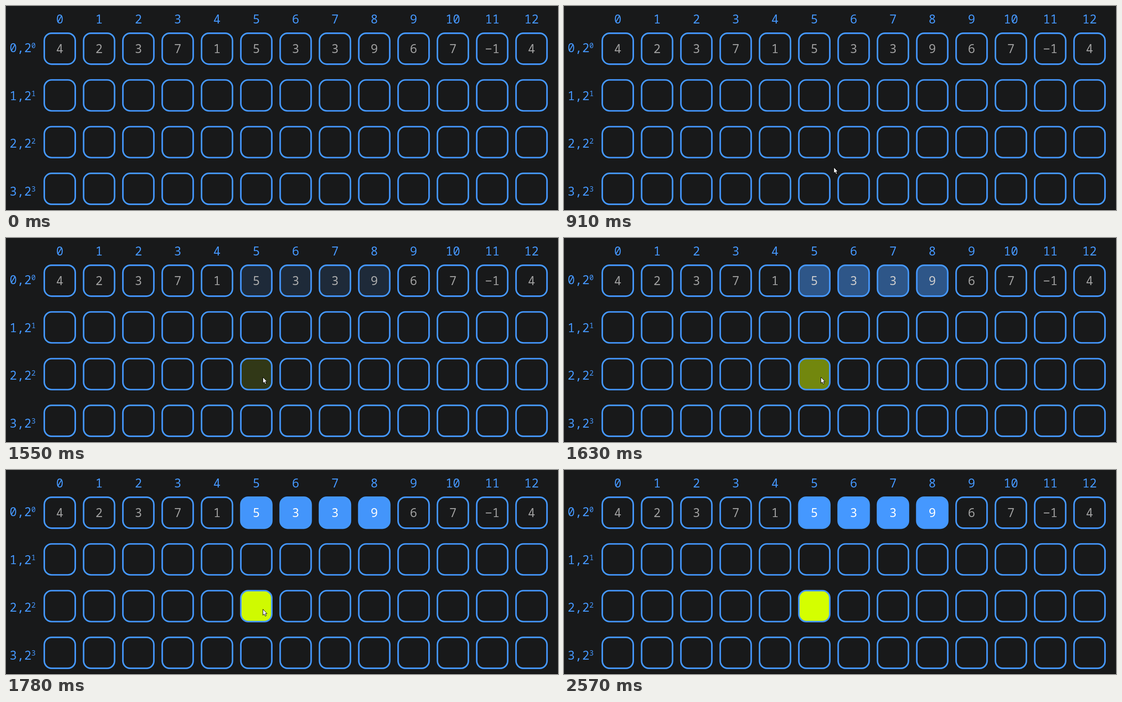
These frames come from a looping animation (1230x455 px, 3190 ms). An HTML page:

```html
<!DOCTYPE html>
<html lang="en">
<head>
<meta charset="utf-8">
<title>Sparse table ranges</title>
<style>
  html, body { margin: 0; width: 100%; height: 100%; overflow: hidden; background: #18191a; }
  svg { display: block; width: 1230px; height: 455px; }
  text { font: 300 27px "Noto Sans Mono", monospace; fill: #4598ff; text-anchor: middle; }
  .label { text-anchor: start; }
  .label tspan { font-size: 16px; }
  .value { fill: #a0a0a0; }
  .cell { fill-opacity: 0; stroke: #4598ff; stroke-width: 3.4; }
  .cursor { fill: #fff; stroke: #000; stroke-linejoin: round; }
</style>
</head>
<body>
<svg viewBox="0 0 1230 455">
  <g id="table"></g>
  <path d="M0 454.5H1230" stroke="#0c0a0b"/>
  <g id="cursor" class="cursor">
    <path id="arrow" d="M0 0V13.4L3 10.7 5.1 15.4 7.4 14.4 5.3 9.8H9.2Z"/>
    <path id="hand" d="M-1.3 7.5V1Q-1.3 -.2 0 -.2T1.3 1V5Q2.6 4.1 3.6 5.4 5 4.6 6 5.9 8.5 5.3 8.5 7.7V10Q8.5 12.5 7.3 14H0Q-1.2 11.7 -3.6 9.4C-5 7.8 -3.2 6.5 -1.3 8.3Z"/>
  </g>
</svg>
<script>
const LOOP = 3190;
// The picture is held between these moments.
const STEPS = [0, 680, 760, 840, 920, 990, 1070, 1140,
  1460, 1540, 1630, 1710, 1780, 2400, 2480, 2570];
const VALUES = [4, 2, 3, 7, 1, 5, 3, 3, 9, 6, 7, "−1", 4];
const START = [640, 426], TARGET = [572.5, 310.5], EXIT = [808, 391];

const $ = id => document.getElementById(id);
const clamp = v => Math.min(1, Math.max(0, v));
const smooth = v => v * v * (3 - 2 * v);
const mix = (a, b, p) => a + (b - a) * p;
const between = (from, to, p) => from.map((v, i) => mix(v, to[i], p));

const columnX = col => 119.8 + 87.6 * col;
const rowY = row => 95.2 + 104.2 * row;

function cell(row, col) {
  const picked = row === 2 && col === 5 ? "#d4ff00"
    : row === 0 && col >= 5 && col <= 8 ? "#4598ff" : "";
  return `<rect class="cell${picked && " picked"}" ${picked && `fill="${picked}"`}
    x="${columnX(col) - 34.5}" y="${rowY(row) - 34.5}" width="69" height="69" rx="16.5"/>`;
}

function buildTable() {
  let markup = "";
  for (let row = 0; row < 4; row++) {
    const base = 103 + 106.7 * row;
    markup += `<text class="label" x="8" y="${base}">${row},2<tspan dy="-9">${row}</tspan></text>`;
    VALUES.forEach((_, col) => markup += cell(row, col));
  }
  VALUES.forEach((value, col) => {
    const x = columnX(col);
    const lit = col >= 5 && col <= 8 ? " lit" : "";
    markup += `<text x="${x}" y="39">${col}</text>
      <text class="value${lit}" x="${x}" y="105">${value}</text>`;
  });
  $("table").innerHTML = markup;
}

function pointerAt(t) {
  if (t < 1460) {
    const p = clamp((t - 680) / 460);
    return between(START, TARGET, 1 - (1 - p) ** 2);
  }
  return between(TARGET, EXIT, clamp((t - 2320) / 160));
}

function draw(t) {
  const glow = smooth(clamp((t - 1460) / 350));
  for (const rect of document.querySelectorAll(".picked")) rect.style.fillOpacity = glow;
  const grey = mix(160, 255, glow);
  for (const text of document.querySelectorAll(".lit")) text.style.fill = `rgb(${grey},${grey},${grey})`;

  const [x, y] = pointerAt(t);
  const overCell = t < 1460 && y < 340;
  $("cursor").setAttribute("transform", `translate(${x} ${y})`);
  $("cursor").style.display = t >= 680 && t < 2570 ? "" : "none";
  $("arrow").style.display = overCell ? "none" : "";
  $("hand").style.display = overCell ? "" : "none";
}

buildTable();
const begin = performance.now();
function tick() {
  const now = (performance.now() - begin) % LOOP;
  draw(STEPS.findLast(step => step <= now) ?? 0);
  requestAnimationFrame(tick);
}
tick();
</script>
</body>
</html>
```
